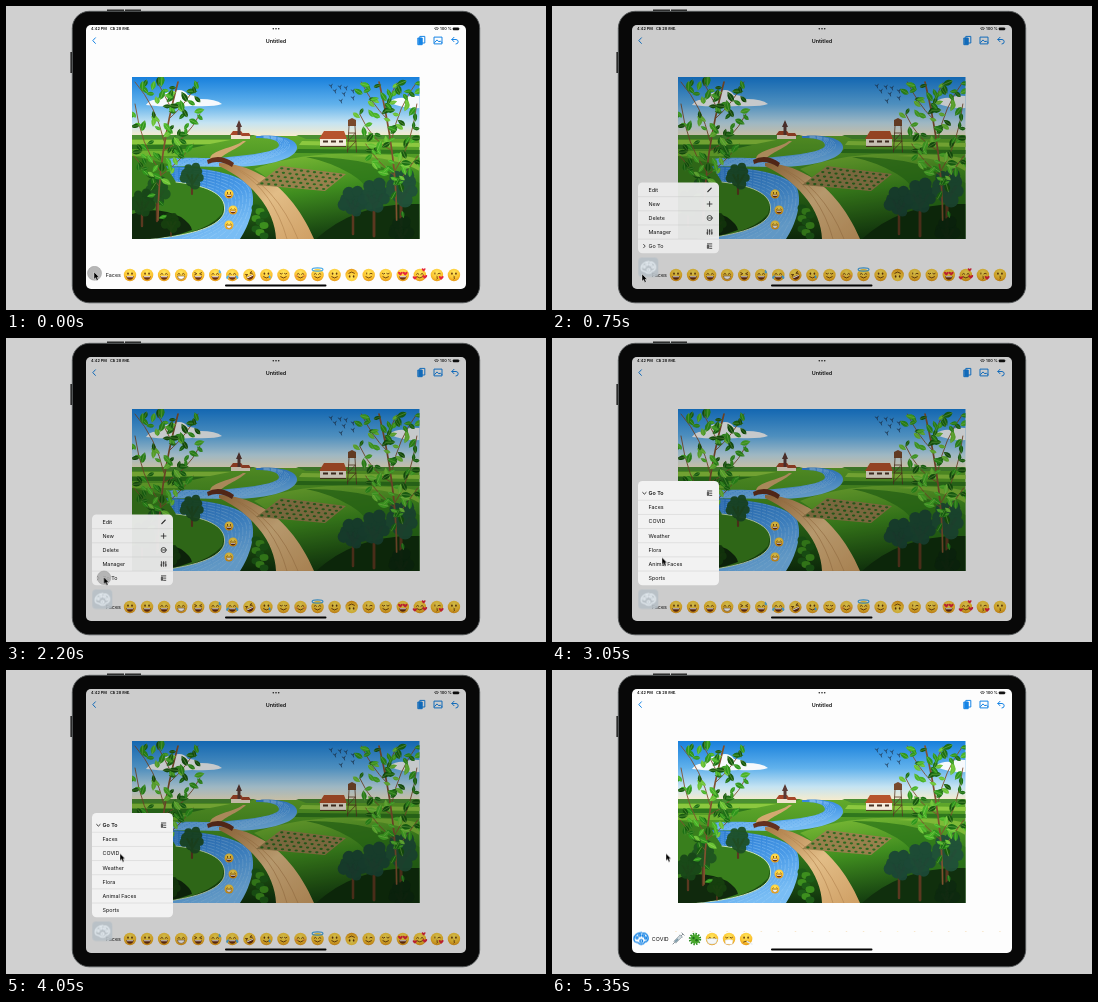
Write an HTML page that moves like this. It is 540x304 px and loops after 5400 ms.

```html
<!DOCTYPE html>
<html lang="en">
<head>
<meta charset="utf-8">
<title>Go To menu</title>
<style>
html, body { margin: 0; width: 100%; height: 100%; overflow: hidden; background: #d0d0d0; }
svg { display: block; width: 100vw; height: 100vh; }
text { font-family: Inter, Roboto, sans-serif; font-size: 5.4px; fill: #111; }
.tiny { font-size: 3.9px; font-weight: 600; }
.bold { font-weight: 600; }
.line { fill: none; stroke-linecap: round; stroke-linejoin: round; }
.anim { animation: 5.4s linear infinite both; }

#cursor { animation-name: travel; animation-timing-function: ease-in-out; }
@keyframes travel {
  0%, 7% { transform: translate(88px, 266px); }
  13.9%, 25% { transform: translate(90px, 268px); }
  37%, 45% { transform: translate(97.7px, 239px); }
  56.5% { transform: translate(110px, 219.5px); }
  68%, 100% { transform: translate(114px, 183.5px); }
}
#press { animation-name: press; }
@keyframes press { 0%, 8% { opacity: 1; } 11%, 100% { opacity: 0; } }
#tap { animation-name: tap; }
@keyframes tap { 0%, 37.5% { opacity: 0; } 39%, 41.5% { opacity: 1; } 43.5%, 100% { opacity: 0; } }
#dim { animation-name: dim; }
@keyframes dim { 0%, 5.5% { opacity: 0; } 12%, 79.6% { opacity: .19; } 83.3%, 100% { opacity: 0; } }
#palette { animation-name: palette; }
@keyframes palette { 0%, 82.5% { opacity: 0; } 83.5%, 100% { opacity: 1; } }
#lifted { animation-name: lift; }
@keyframes lift {
  0%, 5.5% { opacity: 0; transform: translate(89px, 268.5px) scale(.9); }
  12%, 79.6% { opacity: .9; transform: translate(96.3px, 261.5px); }
  83.3%, 100% { opacity: 0; transform: translate(89px, 268.5px) scale(.9); }
}
#menu { animation-name: menu; transform-origin: 92px 247px; }
@keyframes menu {
  0%, 6.5% { opacity: 0; transform: scale(.15); }
  12%, 42.6% { opacity: 1; transform: none; }
  46%, 100% { opacity: 0; transform: none; }
}
#submenu { animation-name: submenu; transform-origin: 92px 247px; }
@keyframes submenu {
  0%, 42.6% { opacity: 0; transform: scaleY(.68); }
  48.2%, 79.6% { opacity: 1; transform: none; }
  83.3%, 100% { opacity: 0; transform: scale(.25); }
}
#rows { animation-name: scroll; }
@keyframes scroll {
  0%, 80.55% { transform: none; animation-timing-function: cubic-bezier(.2, .5, .4, 1); }
  89.8%, 100% { transform: translateY(-14px); }
}
#covid { animation-name: reveal; }
@keyframes reveal { 0%, 80.5% { opacity: 0; } 82%, 100% { opacity: 1; } }
</style>
</head>
<body>
<svg viewBox="0 0 540 304" preserveAspectRatio="none">
  <defs>
    <linearGradient id="sky" x2="0" y2="1">
      <stop stop-color="#1880dc"/><stop offset=".45" stop-color="#62b2ec"/>
      <stop offset=".75" stop-color="#c4e3f2"/><stop offset="1" stop-color="#fdedc8"/>
    </linearGradient>
    <linearGradient id="ground" x2="0" y2="1">
      <stop stop-color="#62a92c"/><stop offset=".35" stop-color="#438f20"/>
      <stop offset=".7" stop-color="#235f15"/><stop offset="1" stop-color="#0f2f0c"/>
    </linearGradient>
    <linearGradient id="hill" x2=".3" y2="1">
      <stop stop-color="#82bf38"/><stop offset=".5" stop-color="#3f8c1f"/><stop offset="1" stop-color="#153f10"/>
    </linearGradient>
    <linearGradient id="water" x2=".5" y2="1">
      <stop stop-color="#2273cc"/><stop offset=".6" stop-color="#4a9be8"/><stop offset="1" stop-color="#79bdf4"/>
    </linearGradient>
    <linearGradient id="road" x2="1" y2="1">
      <stop stop-color="#a97843"/><stop offset=".5" stop-color="#e2bd87"/><stop offset="1" stop-color="#cf9f64"/>
    </linearGradient>
    <radialGradient id="skin" cx=".5" cy=".3" r=".75">
      <stop stop-color="#ffe65c"/><stop offset=".6" stop-color="#fcc531"/><stop offset="1" stop-color="#e08f14"/>
    </radialGradient>
    <clipPath id="photo"><rect x="126" y="71" width="287.5" height="162"/></clipPath>
    <clipPath id="strip"><rect x="98" y="261.5" width="356.5" height="21"/></clipPath>
    <clipPath id="river"><use href="#upper"/><use href="#lower"/></clipPath>
    <g id="art" class="line">
      <path d="M-7 1.3C-7.5-3.5-3-6 1-5.8 5-5.7 7.4-3 7.2.2 7 3 5 3.3 3.8 3.5 2.5 3.8 4 5.5 1 5.7-1 5.9-2 5.4-2.6 4.4-3.5 3.2-6.6 5-7 1.3Z"/>
      <circle cx="-4" cy="-.8" r="1.1"/><circle cx="-1.2" cy="-3.2" r="1.1"/>
      <circle cx="2.3" cy="-3" r="1.1"/><circle cx="4.7" cy="-.4" r="1.1"/><circle cx=".3" cy="2.5" r="1.4"/>
    </g>
    <g id="list" class="line" stroke="#222" stroke-width=".8">
      <path d="M-2.2-2.2h4.4M0 0h2.2M0 2.2h2.2M-2.2-.5v2.7h1.2v-2.7z"/>
    </g>
  </defs>

  <rect width="540" height="304" fill="#d0d0d0"/>
  <path d="M101 5V3.6h17V5M119 5V3.6h16V5M66 46h-1.6v21H66" fill="#222"/>
  <rect x="66.3" y="5.3" width="407.4" height="291.5" rx="17" fill="#080808" stroke="#55585a" stroke-width=".9"/>
  <rect x="80" y="19" width="380" height="264" rx="5" fill="#fdfdfd"/>

  <text class="tiny" x="85" y="24.2">4:42 PM</text>
  <text class="tiny" x="104" y="24.2">СБ 28 янв.</text>
  <text class="tiny" x="434" y="24.2" textLength="">100 %</text>
  <path class="line" d="M428.5 22.2q2-1.5 4 0M429.5 23.4q1-.7 2 0" stroke="#111" stroke-width=".7"/>
  <rect x="446.8" y="21.4" width="6.2" height="2.9" rx=".8" fill="#111"/>
  <path d="M453.6 22.3v1" stroke="#555" stroke-width=".7"/>
  <g fill="#222"><circle cx="267.3" cy="22.8" r=".8"/><circle cx="270" cy="22.8" r=".8"/><circle cx="272.7" cy="22.8" r=".8"/></g>
  <text class="bold" x="270" y="36.8" text-anchor="middle">Untitled</text>
  <g class="line" stroke="#1684e5" stroke-width="1">
    <path d="M89.4 31.8l-2.6 2.8 2.6 2.8"/>
    <path d="M414.2 30.4h4.6v6.6h-4.6z"/><path d="M412.2 32h4v6.7h-4z" fill="#1684e5"/>
    <path d="M428.4 31.1h7.6v6.8h-7.6zM428.6 36.5l2.4-2.6 2 2 1.2-1 1.8 1.8"/>
    <path d="M448 31.3l-2.2 2.2 2.2 2.2M446 33.5h4q2.2.2 2.2 2.3t-2.2 2.2"/>
  </g>

  <g clip-path="url(#photo)">
    <rect x="126" y="71" width="288" height="61" fill="url(#sky)"/>
    <path d="M140 99q4-6 12-5 4-8 16-9 9-3 14 4 8 0 12 4 16 0 22 5-8 3-30 2-25 2-46-1z" fill="#f6f9fc"/>
    <path d="M383 96q8-5 15-4 6-3 16-2v12q-18 1-31-6z" fill="#f6f9fc"/>
    <rect x="126" y="130" width="288" height="104" fill="url(#ground)"/>
    <path d="M126 129h125l-15 4H126zM290 129h124v4H300z" fill="#4b8f32"/>
    <path d="M126 134h98l-20 4h-78zM296 135l118 2v4l-121-2z" fill="#8cc83f"/>
    <path d="M126 139h74l-18 4h-56zM292 143l122 1v4l-126-1z" fill="#2f771d"/>
    <path d="M126 145h55l-10 5h-45z" fill="#70b530"/>
    <path d="M248 163Q310 139 413.5 152V233H300Q292 190 248 163Z" fill="url(#hill)"/>
    <path d="M300 151Q365 150 413.5 177V233H330Q390 196 345 168 325 156 300 151Z" fill="#2b7419" opacity=".75"/>
    <path d="M345 150Q390 151 413.5 165v-12Q385 146 345 150Z" fill="#7eba37"/>
    <path d="M310 233Q350 196 413.5 198V233Z" fill="#102f0d"/>
    <path d="M126 150Q180 160 205 176 222 188 216 208 195 233 126 233Z" fill="#397f1d"/>
    <path id="upper" d="M250 130C276 128 292 134 291 142 290 153 262 161 222 161L166 160 160 153C190 150 205 154 222 151 252 148 273 145 273 139 272 134 264 132 250 132Z" fill="url(#water)"/>
    <path id="lower" d="M160 160C195 161 237 167 245 182 251 197 243 220 234 233H145C178 230 212 223 218 207 222 190 205 180 170 176Z" fill="url(#water)"/>
    <g id="waves" class="line" clip-path="url(#river)" stroke="#a5d5fb" stroke-width=".5" opacity=".75"/>
    <path class="line" d="M170 176C205 180 222 190 218 207 212 223 178 230 145 233" stroke="#d9ecc1" stroke-width=".9"/>
    <path d="M237 135h3C232 143 216 148 213 154l-9-1C204 144 228 142 237 135Z" fill="#d2a970"/>
    <path d="M213 157C250 158 286 182 308 233H270C269 203 244 174 213 160Z" fill="url(#road)"/>
    <path class="line" d="M225 160Q270 178 292 233M232 164Q268 186 281 233" stroke="#b78853" stroke-width=".7"/>
    <path d="M201 154Q214 147 228 157l-2 4Q213 153 202 158Z" fill="#64301d"/>
    <path d="M275 160L340 168 319 185 250 179Z" fill="#98804d"/>
    <g id="crops" fill="#2e6a20"/>
    <path d="M225 128l3-3h6l3 3v5h-12zM236 129l2-2h4l2 2v4h-8z" fill="#f0e4cf"/>
    <path d="M224 129l3-4h8l3 4zM235 130l2-3h6l2 3z" fill="#a6472a"/>
    <path d="M231.5 121h3v8h-3zM230 121l3-7 3 7z" fill="#5b3a35"/>
    <path d="M318 125h20l3 8h-28z" fill="#b6542c"/>
    <path d="M314 133h26v7h-26z" fill="#f4ecdc"/>
    <path d="M317 135.5h5M325 135.5h5M333 135.5h4" stroke="#493225" stroke-width="2"/>
    <path d="M314 140.4h26" stroke="#50351f"/>
    <path d="M342 114l4-2 4 2v6h-8z" fill="#78492c"/>
    <path class="line" d="M343 120l-1.5 26M349 120l1.5 26M342.6 127h6.8l-7.5 8h8.2l-8.6 9" stroke="#5a3823" stroke-width=".8"/>
    <g id="birds" class="line" stroke="#24405f" stroke-width=".8"/>
    <path d="M126 208q25-9 49 3 10 7 11 13-25 10-60 9z" fill="#10290d"/>
    <g id="woods"/>
    <g id="foliage"/>
    <g id="floaters"/>
  </g>

  <g clip-path="url(#strip)">
    <g id="rows" class="anim">
      <g id="faces"><text x="99.8" y="270.8">Faces</text></g>
      <g id="covid" class="anim">
        <text x="99.8" y="284.8">COVID</text>
        <g transform="translate(126 283) rotate(-45)">
          <path d="M-7.5 0h3M4 0h3M7-2v4M4-1.8v3.6" stroke="#6f7b84" stroke-width=".8"/>
          <rect x="-4.5" y="-1.4" width="9" height="2.8" fill="#cbd6dc" stroke="#7c8990" stroke-width=".5"/>
          <rect x="-4" y="-.9" width="4" height="1.8" fill="#7d9aa8"/>
        </g>
        <g transform="translate(143 283)">
          <circle r="5" fill="none" stroke="#2c8b20" stroke-width="2.4" stroke-dasharray="1.4 1.2"/>
          <circle r="4.5" fill="#49a82c"/>
          <circle cx="-1.5" cy="-1" r="1.2" fill="#216e19"/><circle cx="1.6" cy="1.2" r="1.3" fill="#216e19"/>
        </g>
      </g>
    </g>
  </g>
  <use id="palette" class="anim" href="#art" transform="translate(89 268.5)" stroke="#1684e5" stroke-width="1.3"/>
  <rect x="219" y="278.6" width="101.5" height="1.9" rx=".95" fill="#050505"/>

  <rect id="dim" class="anim" x="80" y="19" width="380" height="264" rx="5"/>
  <g id="lifted" class="anim">
    <rect x="-10" y="-10" width="20" height="19.5" rx="4" fill="#b7c0c7"/>
    <use href="#art" stroke="#e6eef4" stroke-width="1.2"/>
  </g>
  <g id="menu" class="anim">
    <rect x="86" y="176.5" width="81" height="70.8" rx="4.5" fill="#ececec" opacity=".96"/>
    <g class="line" stroke="#222" stroke-width=".8">
      <path d="M155.8 185.6l3.4-3.4" stroke-width="1.2"/>
      <path d="M155.2 198h4.8M157.6 195.6v4.8"/>
      <circle cx="157.6" cy="212" r="2.5"/><path d="M156.5 212h2.2"/>
      <path d="M155.4 223.6v4.8M157.6 223.6v4.8M159.8 223.6v4.8M154.8 227h1.2M157 225h1.2M159.2 227h1.2"/>
      <path d="M91.6 238.4l1.6 1.7-1.6 1.7"/>
    </g>
    <use href="#list" x="157.6" y="240.1"/>
  </g>
  <g id="submenu" class="anim">
    <rect x="86" y="143" width="81" height="104.3" rx="4.5" fill="#f2f2f2"/>
    <path class="line" d="M90.7 154.5l1.7 1.6 1.7-1.6" stroke="#222" stroke-width=".9"/>
    <use href="#list" x="157.6" y="155.2"/>
  </g>

  <g fill="#adadad" fill-opacity=".88" stroke="#999" stroke-width=".5">
    <circle id="press" class="anim" cx="88.5" cy="267.3" r="7"/>
    <circle id="tap" class="anim" cx="98" cy="239.8" r="6.8"/>
  </g>
  <g id="cursor" class="anim">
    <path d="M0 0V7.2l1.6-1.5 1.2 2.7 1.4-.6-1.2-2.6h2.2z" fill="#000" stroke="#fff" stroke-width=".4"/>
  </g>
</svg>
<script>
const add = (id, html) => document.getElementById(id).insertAdjacentHTML('beforeend', html);
const repeat = (n, fn) => Array.from({ length: n }, (_, i) => fn(i)).join('');
function seeded(seed) {
  return () => (seed = (seed * 16807) % 2147483647) / 2147483647;
}

// Faces are drawn on a circle of radius 6.2.
const heart = (x, y, s) =>
  `<path transform="translate(${x} ${y}) scale(${s})" d="M0 1.6C-4-1-1.5-3 0-1 1.5-3 4-1 0 1.6Z" fill="#e5283c"/>`;
const stroke = d => `<path class="line" d="${d}" stroke="#65380d" stroke-width=".9"/>`;
const eyes = {
  o: '<ellipse cx="-2" cy="-1.4" rx=".8" ry="1.2" fill="#65380d"/><ellipse cx="2" cy="-1.4" rx=".8" ry="1.2" fill="#65380d"/>',
  h: stroke('M-3.4-.8q1.2-1.8 2.4 0M1-.8q1.2-1.8 2.4 0'),
  c: stroke('M-3.4-1.5q1.2 1.4 2.4 0M1-1.5q1.2 1.4 2.4 0'),
  x: stroke('M-3.4-2.3l2 1-2 1M3.4-2.3l-2 1 2 1'),
  w: stroke('M-2-2v1M1-1.2q1.2-1.2 2.4-.2'),
  l: heart(-2.4, -1.2, 1.1) + heart(2.4, -1.2, 1.1)
};
const mouths = {
  g: '<path d="M-3.7 1h7.4q-.4 3.7-3.7 3.7T-3.7 1Z" fill="#6b2f12"/><path d="M-3.3 1.2h6.6l-.4 1.1h-5.8z" fill="#fff"/>',
  t: '<path d="M-3.7 1h7.4q-.4 3.4-3.7 3.4T-3.7 1Z" fill="#fff" stroke="#65380d" stroke-width=".5"/>',
  s: stroke('M-2.8 1.8q2.8 2.6 5.6 0'),
  k: stroke('M0 1.3q1.6.5 0 1.3 1.6.5 0 1.3'),
  m: '<path d="M-5.5 0Q0-1 5.5 0L4 4Q0 6.4-4 4Z" fill="#f3f6f8" stroke="#b9c5cc" stroke-width=".4"/>',
  n: '<path d="M-4 1.3Q0-.3 4 1.3L3 5.6-3.5 5Z" fill="#fff" stroke="#ccc" stroke-width=".4"/>',
  p: stroke('M-2.5 3q2.5-1.8 5 0') + '<path class="line" d="M1 2.6l5 2.5" stroke="#e7eef2" stroke-width="1.3"/>'
};
const extras = {
  S: '<path d="M4-5.5q3 3 .8 4-2.5-.5-.8-4Z" fill="#58b5ec"/>',
  T: '<path d="M-3.6 0q-4 2-1.8 4 2 0 1.8-4ZM3.6 0q4 2 1.8 4-2 0-1.8-4Z" fill="#4fb3ee"/>',
  D: '<path d="M3 0q2.5 2.8.4 3.5-2-.5-.4-3.5Z" fill="#4fb3ee"/>',
  B: '<g fill="#f0784a" opacity=".6"><circle cx="-4" cy="1" r="1.2"/><circle cx="4" cy="1" r="1.2"/></g>',
  O: '<ellipse cy="-5.5" rx="5.4" ry="1.6" fill="none" stroke="#49a9e5" stroke-width="1.2"/>',
  H: heart(-5, 3, 1) + heart(5, 2, 1.1) + heart(3.8, -5, .9),
  K: heart(4.3, 3, 1.1),
  R: ''
};
const turn = { R: -25, U: 180 };
function face(x, y, code, size = 1) {
  const [eye, mouth, extra = ''] = code;
  return `<g transform="translate(${x} ${y}) rotate(${turn[extra] || 0}) scale(${size})">
    <circle r="6.2" fill="url(#skin)"/>${eyes[eye]}${mouths[mouth]}${extras[extra] || ''}</g>`;
}
const row = (codes, x, y) =>
  codes.split(' ').map((code, i) => face(x + i * 17.05, y, code)).join('');

add('faces', row('og og hg ht xg hgS hgT xgR osD cs hsB hsO os osU ws cs lg hsH wkK ok', 124, 269));
add('covid', row('hm cn op', 160, 283));
add('floaters', face(223, 188, 'og', .73) + face(227, 204, 'hg', .73) + face(223, 219, 'ht', .73));

// Menu rows
const pitch = 14.15;
function items(id, labels, top, boldFirst) {
  add(id, labels.map((label, i) => {
    const y = top + i * pitch;
    const rule = i ? `<path d="M86 ${y - pitch / 2}h81" stroke="#bbb" stroke-width=".35"/>` : '';
    return `${rule}<text x="96.5" y="${y + 1.9}" class="${boldFirst && !i ? 'bold' : ''}">${label}</text>`;
  }).join(''));
}
items('menu', ['Edit', 'New', 'Delete', 'Manager', 'Go To'], 183.6);
items('submenu', ['Go To', 'Faces', 'COVID', 'Weather', 'Flora', 'Animal Faces', 'Sports'], 155.2, true);

// Landscape details
add('waves', repeat(7, i => {
  const k = i * 3.6;
  return `<path d="M160 ${162 + k * .5}C${200 - k} ${162 + k * .6} ${243 - k} ${168 + k * .6} ${244 - k} ${188 + k * .4}
    S${235 - k} 220 ${228 - k * 2.5} 233" stroke-dasharray="7 2 3 2"/>
    <path d="M258 ${130 + i * .4}C${294 - k * .7} 131 ${300 - k} 150 222 ${160 - i * 1.3}H165" stroke-dasharray="5 2"/>`;
}));
add('crops', repeat(50, i => {
  const u = (i % 10 + .5) / 10, v = (Math.floor(i / 10) + .5) / 5;
  const x = 275 - 25 * v + u * (65 + 4 * v), y = 160 + 19 * v + u * (8 - 2 * v);
  return `<ellipse cx="${x}" cy="${y}" rx="1.7" ry="1.1"/>`;
}));
const flock = [[325, 80], [334, 81], [340, 82], [347, 85], [329, 85], [338, 88], [347, 92], [335, 95]];
add('birds', flock.map(([x, y]) => `<path d="M${x - 1.8} ${y - 1}l2 1.2 1-2M${x} ${y}l.6 2"/>`).join(''));

const rand = seeded(71);
function tree(x, y, r, base, color) {
  const blobs = repeat(12, i => {
    const a = i * 2.4, d = r * .24 * Math.sqrt(i);
    return `<circle cx="${x + Math.cos(a) * d}" cy="${y + Math.sin(a) * d}" r="${r * (.3 + rand() * .18)}"/>`;
  });
  return `<path class="line" d="M${x} ${base}V${y}M${x} ${y + r * .8}l${r * .5} ${-r * .8}M${x} ${y + r * .7}l${-r * .4} ${-r * .7}"
    stroke="#5b3820" stroke-width="${r * .18}"/><g fill="${color}" opacity=".94">${blobs}</g>`;
}
add('woods',
  tree(186, 169, 12, 188, '#1d4f25') + tree(151, 185, 13, 215, '#1e5420') + tree(136, 196, 13, 220, '#184618') +
  tree(395, 181, 17, 226, '#205039') + tree(347, 195, 14, 228, '#1b4636') + tree(368, 189, 16, 230, '#1c4937') +
  tree(165, 216, 9, 230, '#17400f') + tree(395, 224, 12, 236, '#0d2a10') +
  repeat(9, i => `<ellipse cx="${250 + (i % 3) * 4}" cy="${202 + i * 3.5}" rx="4.5" ry="3.4" fill="${i % 2 ? '#3d8f1e' : '#1d5c17'}"/>`));

// Each branch is a quadratic curve: start, control, end.
const branches = [
  [152, 214, 152, 150, 172, 76], [158, 135, 150, 100, 129, 76], [164, 112, 180, 98, 192, 76],
  [157, 145, 180, 135, 194, 108], [154, 165, 135, 140, 129, 98], [153, 180, 140, 165, 128, 150],
  [154, 170, 172, 158, 187, 138], [166, 104, 158, 88, 152, 77]
];
const greens = ['#1c6f15', '#2f971d', '#48b328', '#17580f', '#69c235'];
function foliage(seed, mapX) {
  const rnd = seeded(seed);
  let twigs = '', leaves = '';
  branches.forEach(([x0, y0, cx, cy, x1, y1], b) => {
    twigs += `<path d="M${mapX(x0)} ${y0}Q${mapX(cx)} ${cy} ${mapX(x1)} ${y1}" stroke-width="${b ? .9 : 1.7}"/>`;
    leaves += repeat(b ? 11 : 15, i => {
      const t = (i + 1 + rnd()) / (b ? 12 : 16), q = 1 - t;
      const x = mapX(q * q * x0 + 2 * q * t * cx + t * t * x1) + (rnd() - .5) * 15;
      const y = q * q * y0 + 2 * q * t * cy + t * t * y1 + (rnd() - .5) * 12;
      const s = .75 + rnd() * .5;
      return `<g transform="translate(${x} ${y}) rotate(${rnd() * 360}) scale(${s})">
        <path d="M-4.5 0Q-1-4.6 4.8 0-1 4.6-4.5 0Z" fill="${greens[Math.floor(rnd() * 5)]}"/>
        <path d="M-4.5 0H4" stroke="#b1dc70" stroke-width=".3"/></g>`;
    });
  });
  add('foliage', `<g class="line" stroke="#80512f">${twigs}</g>${leaves}`);
}
foliage(29, x => x);
foliage(83, x => 413.5 - (x - 126) * .88);
</script>
</body>
</html>
```
